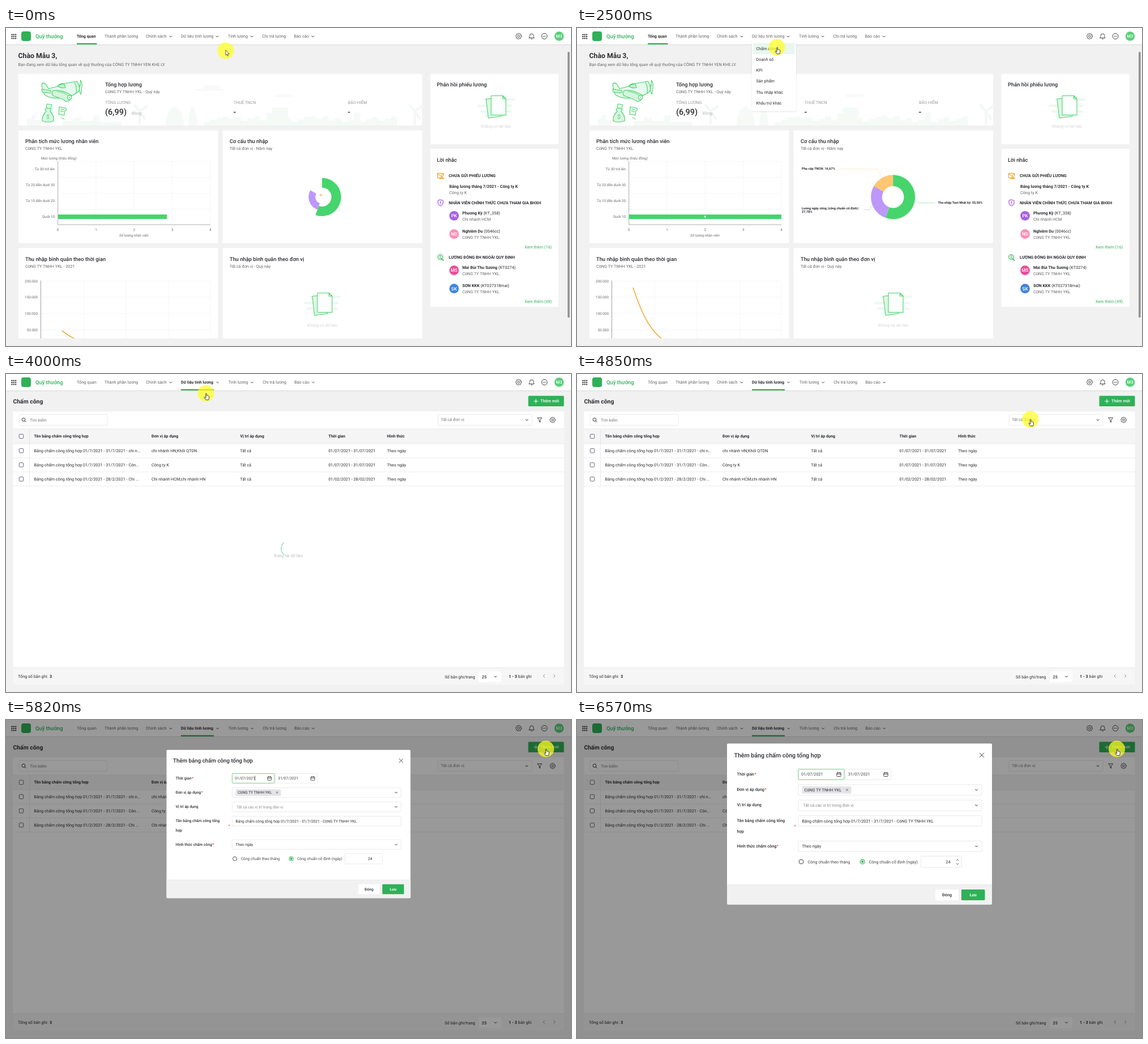
Recreate the animation shown at these times as an HTML page. Size 998 by 561 pixels, loop 6820 ms.

```html
<!DOCTYPE html>
<html lang="vi">
<head>
<meta charset="utf-8">
<title>Payroll walkthrough</title>
<style>
html, body { margin: 0; width: 100%; height: 100%; overflow: hidden; background: #f1f1f1; }
svg { display: block; width: 100vw; height: 100vh; font-family: Roboto, Arial, sans-serif; text-rendering: geometricPrecision; }
</style>
</head>
<body>
<svg id="stage" viewBox="0 0 998 561" preserveAspectRatio="none"></svg>
<script>
const GREEN = '#2fb157', LIME = '#46d56c', DARK = '#2b2d31', MID = '#666', PALE = '#e0e0e0';
const LOOP = 6820;
const COMPANY = 'CôNG TY TNHH YKL';

// Markup helpers
const text = (x, y, s, { size = 7.28, fill = DARK, w = 400, a = 'start', i = 0 } = {}) =>
  `<text x="${x}" y="${y}" font-size="${size}" fill="${fill}" font-weight="${w}" text-anchor="${a}"${i ? ' font-style="italic"' : ''}>${s}</text>`;
const rect = (x, y, w, h, fill = '#fff', extra = '') =>
  `<rect x="${x}" y="${y}" width="${w}" height="${h}" fill="${fill}" ${extra}/>`;
const path = (d, stroke, w = 1, fill = 'none', extra = '') =>
  `<path d="${d}" stroke="${stroke}" stroke-width="${w}" fill="${fill}" stroke-linecap="round" stroke-linejoin="round" ${extra}/>`;
const disc = (x, y, r, fill, extra = '') => `<circle cx="${x}" cy="${y}" r="${r}" fill="${fill}" ${extra}/>`;
const group = (id, body) => `<g id="${id}">${body}</g>`;
const at = (x, y, body) => `<g transform="translate(${x} ${y})">${body}</g>`;
const chevron = (x, y, c = '#444') => path(`M${x - 2} ${y - 1}l2 2 2-2`, c, 1);
const field = (x, y, w, h, stroke = PALE) => rect(x, y, w, h, '#fff', `stroke="${stroke}" stroke-width=".7" rx="1.2"`);
const cross = (x, y, r, c, w) => path(`M${x - r} ${y - r}l${2 * r} ${2 * r}m0 ${-2 * r}l${-2 * r} ${2 * r}`, c, w);

function gear(x, y, r) {
  let d = '';
  for (let k = 0; k < 32; k++) {
    const a = k * Math.PI / 16, q = k % 4 < 2 ? r : r * .8;
    d += (k ? 'L' : 'M') + (x + q * Math.cos(a)).toFixed(2) + ' ' + (y + q * Math.sin(a)).toFixed(2);
  }
  return path(d + 'Z', '#333', .9) + disc(x, y, r * .36, 'none', 'stroke="#333" stroke-width=".9"');
}

// Top bar
function nav(id, active) {
  const s = active ? .7 : 0;
  const items = [[125, 'Tổng quan'], [174, 'Thành phần lương'], [247, 'Chính sách', 291], [309, 'Dữ liệu tính lương', 373 + s],
    [392 + s, 'Tính lương', 434 + s], [452.5 + s, 'Chi trả lương'], [508.5 + s, 'Báo cáo', 542 + s]];
  const on = active ? 3 : 0;
  return group(id, items.map(([x, label, c], k) =>
    text(x, 17.3, label, k === on ? { size: 7.2, w: 700 } : { size: 7.4, fill: MID }) + (c ? chevron(c, 15) : '')).join('') +
    (active ? rect(309, 26.7, 58, 2.3, GREEN) : rect(125, 26.7, 35.5, 2.3, GREEN)));
}

function topBar() {
  let dots = '';
  for (let k = 0; k < 9; k++) dots += rect(9.4 + k % 3 * 3.3, 10.6 + (k / 3 | 0) * 3.3, 2.2, 2.2, '#333', 'rx=".6"');
  return rect(0, 28, 998, 2.2, '#dcdcdc') + rect(0, 0, 998, 29) + dots +
    rect(27, 6, 17, 17, GREEN, 'rx="4"') +
    text(52, 17.8, 'Quỹ thưởng', { size: 9.4, fill: GREEN, w: 500 }) +
    nav('navHome', 0) + nav('navList', 1) + gear(905.5, 14.5, 5.2) +
    path('M924 17.5h9c-1-1.2-1.2-2-1.2-4a3.3 3.3 0 0 0-6.6 0c0 2-.2 2.8-1.2 4zM927.3 19.3q1.2 1 2.4 0', '#333', .9) +
    disc(951, 14.5, 5, 'none', 'stroke="#333" stroke-width=".9"') +
    [-2.1, 0, 2.1].map(d => disc(951 + d, 14.5, .7, '#333')).join('') +
    disc(977, 14.5, 8.3, '#5bd07b') + text(977, 17.2, 'M3', { size: 7.5, fill: '#fff', w: 500, a: 'middle' });
}

// Dashboard
const card = (x, y, w, h) => rect(x, y, w, h, '#fff', 'rx="1.5"');
const heading = (x, y, s, sub) => text(x, y, s, { size: 9.36, w: 500 }) + text(x, y + 12.2, sub, { fill: MID });

const emptyState = (x, y, drop) => at(x, y,
  [[-22, -15, 55], [-33, -4, 62], [-28, 6, 56], [-20, 13, 40]].map(([a, b, w]) => rect(a, b, w, 4, '#ecf8f0', 'rx="2"')).join('') +
  path('M-17.500-14l23-2.500 4 33-23 3.200z'.replace(/00/g, ''), LIME, 1.1, '#e0f6e7') +
  path('M-8.5-19.800h20.500l5.500 5.500v28.500h-26z'.replace(/00/g, ''), LIME, 1.1, '#fbfefc') + path('M12-19.8v5.5h5.5z', LIME, 1.1, '#cdf2d8')) +
  text(x, y + drop, 'Không có dữ liệu', { fill: '#d4d4d4', a: 'middle', i: 1, size: 7.4 });

function skyline() {
  let d = 'M37 172v-12h8v-7h6v9h10v10zM100 172v-8h18v-6h14v6h22v-10h12v12h38v6z' +
    'M282 172q0-26 16-34 16 8 16 34zM322 172q1-28 8-33 7 5 8 33z';
  for (let k = 0; k < 31; k++) {
    const h = 6 + (k * 37 % 11) + (k % 7 === 3 ? 9 : 0);
    d += `M${350 + k * 11} 172v${-h}h11v${h}z`;
  }
  const blades = (x, y) => path(`M${x} ${y + 22}V${y}l-9-11M${x} ${y}l13-9M${x} ${y}l9 13`, '#f3f7f5', 4);
  return path(d, 'none', 0, '#f5faf7') + blades(236, 147) + blades(722, 147) +
    rect(334, 107, 52, 4, '#f8faf9', 'rx="2"') + rect(348, 101, 30, 9, '#f8faf9', 'rx="4"') +
    rect(475, 117, 33, 5, '#f8faf9', 'rx="2"') + rect(470, 140, 28, 32, '#f5faf7');
}

const plane =
  path('M66 111q-4-8-2-14 4-1 7 3l4 7 16-4q5-6 12-5l22-4q6 7 4 17-8 8-22 11-24 5-37-3-4-2-4-8z', LIME, 1.2, '#e6f9ec') +
  path('M63 108l16 2q1 4-2 5l-13-2zM92 103q4-5 11-4l2 6q-7 2-13-2zM121 96q5 8 3 18', LIME, 1.1, '#c9f1d5') +
  path('M84 110q16-1 32 9-1 9-9 11-9-6-23-10-6-5 0-10z', LIME, 1.2, '#d5f5de') + path('M90 112q12 1 23 9', LIME, .9) +
  path('M128 101h4M131.500 92q4 6 2.500 12.500-1 6-1.500 12.500-4-5-2.500-12.500 2-6 1.500-12.500z', LIME, 1.1, '#f2fcf5') +
  disc(112, 122.5, 3.6, '#fff', `stroke="${LIME}" stroke-width="1.3"`) + disc(112, 122.5, 1, LIME) +
  path('M71 140l1-6 9 1-2 7z', LIME, 1, '#e3f8ea') +
  path('M69 143q5-3 11 0l-2 4q8 9 6 17-10 4-20 0-1-9 7-17z', LIME, 1.2, '#d9f6e2') +
  text(74, 160, '$', { size: 10, fill: LIME, a: 'middle' }) +
  path('M94 139l11 2q4 4-1 5l-1 8-10-2z', LIME, 1.1, '#e9faee') + path('M97 143l5 1M96.5 146.500l5 1M98 158l5 3', LIME, 1);

function barChart() {
  const small = { size: 6.3, fill: MID };
  return heading(34, 202.5, 'Phân tích mức lương nhân viên', COMPANY) +
    text(62, 232, 'Mức lương (triệu đồng)', { ...small, i: 1 }) +
    path('M92 235.5h269M92 263.5h269M92 291.5h269M92 319.5h269M159 235v112M226.5 235v112M293.5 235v112M361 235v112', '#f3f3f3', .7) +
    ['Từ 30 trở lên', 'Từ 20 đến dưới 30', 'Từ 10 đến dưới 20', 'Dưới 10'].map((s, k) => text(86, 251 + 28 * k, s, { ...small, a: 'end' })).join('') +
    [0, 1, 2, 3, 4].map(k => text(91.5 + 67.4 * k, 358, k, { ...small, a: 'middle' })).join('') +
    text(226, 368.3, 'Số lượng nhân viên', { ...small, a: 'middle', i: 1 }) +
    `<rect id="bar" x="92" y="329" height="8" fill="${LIME}"/>` + path('M91.7 235v112h269', '#999', .8);
}

const bold = { size: 5.7, w: 700 };
const pieLabels = path('M463 249h68l7.5 15', '#fbe0ae', .7) + path('M596.5 305l7 3.5h29', '#8be2a6', .7) + path('M506 320.5h11.5l4-9', '#d6bdfb', .7) +
  text(397, 250.3, 'Phụ cấp TNCN: 16,67%', bold) + text(637.5, 310.4, 'Thu nhập Test Nhật ký: 55,56%', bold) +
  text(397, 319.5, 'Lương ngày công (công chuẩn cố định):', bold) + text(397, 325.6, '27,78%', bold) +
  text(226, 335.3, '4', { size: 6.2, fill: '#fff', w: 700, a: 'middle' });

function lineChart() {
  return heading(34, 410.5, 'Thu nhập bình quân theo thời gian', COMPANY + ' - 2021') +
    path('M62 446.5h299M62 475h299M62 503.7h299M62 532.5h299M137 446v102M212 446v102M287.5 446v102M361 446v102', '#f3f3f3', .7) +
    [200, 150, 100, 50].map((n, k) => text(56, 448.5 + 28.7 * k, n + '.000', { size: 6.3, fill: MID, a: 'end' })).join('') +
    path('M61.5 446v102', '#888', .8) +
    '<path id="curve" fill="none" stroke="#f79e1b" stroke-width="1.4"/>';
}

const person = (y, color, ini, name, code, unit) => disc(791.5, y, 8.4, color) +
  text(791.5, y + 2.9, ini, { size: 8, fill: '#fff', w: 500, a: 'middle' }) +
  text(806, y - 2.3, `<tspan font-weight="700">${name}</tspan> (${code})`) + text(806, y + 8.5, unit, { fill: MID });

function sidebar() {
  const head = { w: 700 }, more = { fill: GREEN, a: 'end' };
  return card(749.5, 81, 226.5, 124) + text(761, 102.8, 'Phản hồi phiếu lương', { size: 9.36, w: 500 }) + emptyState(865.5, 139.3, 36.7) +
    card(749.5, 213, 226.5, 279) + text(761, 235.6, 'Lời nhắc', { size: 9.36, w: 500 }) +
    disc(767.5, 260.5, 7, '#fff6e9') + path('M762.5 256.5h10v4M762.5 256.5v8h5M762.5 257l5 4 5-4', '#f59b23', 1) + path('M770 261l3.4 5h-6.8z', '#f59b23', .8, '#fbbd62') +
    text(782, 263, 'CHƯA GỬI PHIẾU LƯƠNG', head) +
    text(783, 282.3, 'Bảng lương tháng 7/2021 - Công ty K', head) + text(783, 293, 'Công ty K', { fill: MID }) +
    disc(767.5, 308.5, 7, '#f5ecfc') + path('M767.5 303l4.5 1.6v4q-.5 3.5-4.5 5.4-4-1.9-4.5-5.4v-4zM767.5 306v3.5M767.5 311.3v.1', '#9a52d8', 1) +
    text(782, 311, 'NHÂN VIÊN CHÍNH THỨC CHƯA THAM GIA BHXH', head) +
    person(331.3, '#a661df', 'PK', 'Phương Kỳ', 'KT_358', 'Chi nhánh HCM') +
    person(363.5, '#fb90b3', 'ND', 'Nghiêm Du', '0046cc', COMPANY) + text(964, 389, 'Xem thêm (16)', more) +
    disc(767.5, 404.5, 7, '#e8f8ed') + disc(767, 404, 4.2, 'none', `stroke="${GREEN}" stroke-width="1"`) +
    text(767, 406.3, '$', { size: 6.2, fill: GREEN, a: 'middle' }) + path('M769 407l3.5 3', GREEN, 1.6) +
    text(782, 407, 'LƯƠNG ĐÓNG BH NGOÀI QUY ĐỊNH', head) +
    person(427.5, '#ec4d9b', 'MS', 'Mai Bùi Thu Sương', 'KT0274', COMPANY) +
    person(459.7, '#3f86dc', 'SK', 'SƠN KKK', 'KT027318mai', COMPANY) + text(964, 485.2, 'Xem thêm (49)', more);
}

function dashboard() {
  const cap = { fill: '#999' }, big = { size: 14.5, w: 500 };
  return text(21.5, 53, 'Chào Mẫu 3,', { size: 12.3, w: 700 }) +
    text(21.5, 67, 'Bạn đang xem dữ liệu tổng quan về quỹ thưởng của CÔNG TY TNHH YEN KHE LY.', { fill: MID }) +
    card(22, 81, 713, 91) + skyline() + plane + heading(175, 102.8, 'Tổng hợp lương', COMPANY + ' - Quý này') +
    text(175, 134, 'TỔNG LƯƠNG', cap) + text(402, 134, 'THUẾ TNCN', cap) + text(604, 134, 'BẢO HIỂM', cap) +
    text(175, 153.3, '(6,99)', big) + text(222, 153.3, 'Đồng', { fill: '#b0b0b0' }) + text(401.5, 153.3, '-', big) + text(603.5, 153.3, '-', big) +
    card(22, 180.5, 352.5, 199) + barChart() +
    card(382.5, 180.5, 352.5, 199) + heading(395, 202.5, 'Cơ cấu thu nhập', 'Tất cả đơn vị - Năm nay') +
    `<path id="s0" fill="${LIME}"/><path id="s1" fill="#be97fb"/><path id="s2" fill="#fec671"/>` + group('labels', pieLabels) +
    `<g clip-path="url(#fold)">${card(22, 388, 352.5, 170)}${lineChart()}${card(382.5, 388, 352.5, 170)}</g>` +
    heading(395, 410.5, 'Thu nhập bình quân theo đơn vị', 'Tất cả đơn vị - Quý này') + emptyState(558.5, 487.3, 40) +
    sidebar() + rect(992, 42, 3.6, 469, '#939393', 'rx="1.8"');
}

const menu = () => rect(309, 22, 78, 124.5, '#fff', 'rx="2" filter="url(#soft)"') +
  '<rect id="pick" x="311.5" y="26.5" width="73" height="19.5" fill="#e8f7ef"/>' +
  ['Chấm công', 'Doanh số', 'KPI', 'Sản phẩm', 'Thu nhập khác', 'Khấu trừ khác'].map((s, k) => text(316.5, 38.5 + 19.25 * k, s)).join('');

// Timesheet list
const checkbox = y => rect(23.3, y - 3.7, 7.4, 7.4, '#fff', 'stroke="#55566b" stroke-width=".9" rx="1.3"');
const columns = [49.5, 257, 413.5, 569.5, 673];

function listPage() {
  const heads = ['Tên bảng chấm công tổng hợp', 'Đơn vị áp dụng', 'Vị trí áp dụng', 'Thời gian', 'Hình thức'];
  return text(12.5, 51.5, 'Chấm công', { size: 10.4, w: 700 }) +
    '<rect id="add" x="922.5" y="38.5" width="63" height="18.5" rx="1.5"/>' + path('M932.5 48h7M936 44.5v7', '#fff', 1) +
    text(944, 50.4, 'Thêm mới', { fill: '#fff', w: 500 }) +
    rect(12.5, 66, 973, 452) + field(23, 71.5, 156, 19) +
    disc(31, 80.5, 2.9, 'none', 'stroke="#333" stroke-width="1"') + path('M33.2 82.8l2 2', '#333', 1) +
    text(42, 83.5, 'Tìm kiếm', { fill: '#777' }) + field(763, 71.5, 166, 19) + text(768, 83.3, 'Tất cả đơn vị', { fill: '#777' }) + chevron(920, 81.2, '#222') +
    path('M939 77.2h7.5l-2.9 4v4l-1.7-1.2v-2.8z', '#333', .9) + gear(965.5, 81, 4.9) +
    rect(12.5, 97, 973, 26, '#f5f5f6') + path('M12.5 97h973M12.5 123h973', '#e3e3e3', .7) + path('M41.5 97v26', PALE, .7) +
    checkbox(109.9) + heads.map((s, k) => text(columns[k], 112.3, s, { w: 700, size: 7.1 })).join('') +
    rect(12.5, 518, 973, 30, '#f6f6f6') + path('M12.5 518h973', '#e3e3e3', .7);
}

function listRows() {
  const rows = [['01/7/2021 - 31/7/2021 - chi n...', 'chi nhánh HN;Khối QTDN', '01/07/2021 - 31/07/2021'],
    ['01/7/2021 - 31/7/2021 - Côn...', 'Công ty K', '01/07/2021 - 31/07/2021'],
    ['01/2/2021 - 28/2/2021 - Chi ...', 'Chi nhánh HCM;chi nhánh HN', '01/02/2021 - 28/02/2021']];
  return rows.map(([name, unit, span], k) => {
    const y = 135.3 + 25 * k;
    return checkbox(y) + ['Bảng chấm công tổng hợp ' + name, unit, 'Tất cả', span, 'Theo ngày'].map((s, c) => text(columns[c], y + 2.4, s)).join('') +
      path(`M12.5 ${148 + 24.8 * k}h973`, '#e6e6e6', .7);
  }).join('') + path('M41.5 123v74.6', PALE, .7) +
    text(21, 536, 'Tổng số bản ghi: <tspan font-weight="700" dx="1">3</tspan>') + text(775, 536.5, 'Số bản ghi/trang') +
    rect(835, 524.5, 40, 19) + text(840.5, 536.5, '25', { w: 500 }) + chevron(864.5, 534, '#222') +
    text(888, 536.2, '<tspan font-weight="700">1 - 3</tspan> bản ghi') +
    path('M951.5 530.5l-2.5 2.5 2.5 2.5M967.5 530.5l2.5 2.5-2.5 2.5', '#888', .9);
}

const loader = group('ring', path('M-8.3-10A13 13 0 0 0-8.3 10', '#66c4a0', 1.6)) +
  text(499, 322.8, 'Đang tải dữ liệu', { a: 'middle', fill: '#888' });

// Dialog
const calendar = (x, y) => rect(x - 3.6, y - 3, 7.2, 6.6, 'none', 'stroke="#333" stroke-width=".9" rx=".8"') +
  path(`M${x - 3.6} ${y - .6}h7.2M${x - 1.8} ${y - 4}v1.6M${x + 1.8} ${y - 4}v1.6`, '#333', .9);

function dialog() {
  const star = '<tspan fill="#f0322f" dx=".5">*</tspan>';
  const label = (y, s) => text(282.5, y, s, { w: 500, size: 7.3 });
  return rect(265, 41.5, 468, 284, '#fff', 'rx="2"') + rect(265, 290.5, 468, 35, '#f1f1f1', 'rx="2"') + path('M265 290.5h468', PALE, .6) +
    text(277.5, 65.7, 'Thêm bảng chấm công tổng hợp', { size: 10.6, w: 500 }) + cross(715, 62, 3.8, '#444', 1) +
    label(98.3, 'Thời gian' + star) + field(391, 86.8, 81, 18.4, GREEN) + text(396, 98.3, '01/07/2021', { fill: '#444' }) + calendar(462.5, 96) +
    field(474, 86.8, 81, 18.4) + text(479, 98.3, '31/07/2021', { fill: '#444' }) + calendar(545.5, 96) +
    '<rect id="caret" x="434.3" y="91" width=".8" height="9.5" fill="#222"/>' +
    label(125.2, 'Đơn vị áp dụng' + star) + field(391, 114, 324, 18.5) + rect(397.5, 117, 87, 12.8, '#e4e4e8', 'rx="1.5"') +
    text(401.5, 125.9, COMPANY) + cross(477, 123.3, 1.7, '#555', .8) + chevron(705.5, 123.3, '#222') +
    label(152.3, 'Vị trí áp dụng') + field(391, 141.2, 324, 18.8) + text(399.5, 153.3, 'Tất cả các vị trí trong đơn vị', { fill: '#888' }) + chevron(705.5, 150.7, '#222') +
    label(180.2, 'Tên bảng chấm công tổng') + label(198.5, 'hợp') + text(383.5, 189.5, '*', { fill: '#f0322f' }) +
    field(391, 168.7, 324, 18.5) + text(397.5, 180.6, 'Bảng chấm công tổng hợp 01/7/2021 - 31/7/2021 - ' + COMPANY) +
    label(225, 'Hình thức chấm công' + star) + field(391, 213.5, 324, 18.5) + text(397.5, 225.4, 'Theo ngày') + chevron(705.5, 223, '#222') +
    disc(396, 250, 3.9, '#fff', 'stroke="#444" stroke-width="1"') + text(407.5, 252.5, 'Công chuẩn theo tháng', { fill: '#444' }) +
    disc(504.2, 250, 3.9, '#fff', `stroke="${GREEN}" stroke-width="1.1"`) + disc(504.2, 250, 2.1, GREEN) +
    text(515.5, 252.5, 'Công chuẩn cố định (ngày)', { fill: '#444' }) + field(607.3, 240.3, 72, 19.7) + text(659.5, 252.8, '24', { a: 'end' }) +
    group('steps', path('M670 248l2-2 2 2M670 253l2 2 2-2', '#555', .9)) +
    rect(633, 299, 41, 19, '#fff', 'rx="1.5"') + text(653.5, 311.2, 'Đóng', { a: 'middle', w: 500 }) +
    rect(679, 299, 41.5, 19, GREEN, 'rx="1.5"') + text(699.7, 311.2, 'Lưu', { a: 'middle', w: 700, fill: '#fff' });
}

const pointer = disc(0, 0, 14.6, '#ffff22', 'opacity=".73"') +
  group('arrow', path('M0-.5v8.5l2-1.8 1.4 3.3 1.3-.6-1.4-3.1h2.6z', '#222', .7, '#fff')) +
  group('hand', path('M-.2.6q.9-1 1.7 0v3.6q.8-.6 1.5.2.8-.5 1.5.3.9-.3 1.2.7v3l-1 3.3h-4.7l-2.9-4.3q.3-1.3 1.5-.4l1.2 1z', '#111', .8, '#fff'));

const stage = document.getElementById('stage');
stage.innerHTML = `<defs><clipPath id="fold"><rect width="998" height="547.5"/></clipPath>
  <filter id="soft" x="-20%" y="-20%" width="140%" height="140%"><feDropShadow dx="0" dy="1" stdDeviation="1.2" flood-opacity=".13"/></filter></defs>` +
  rect(0, 0, 998, 561, '#f1f1f1') + group('home', dashboard()) + group('list', listPage() + group('rows', listRows()) + group('load', loader)) +
  topBar() + group('menu', menu()) + rect(0, 0, 998, 561, '#000', 'id="shade" opacity=".4"') + group('dialog', dialog()) + group('pointer', pointer);

const $ = {};
stage.querySelectorAll('[id]').forEach(e => $[e.id] = e);

// Motion
const clamp = v => Math.max(0, Math.min(1, v));
const ramp = (t, a, b) => clamp((t - a) / (b - a));
const easeOut = p => 1 - (1 - p) ** 3;
const show = (id, on) => $[id].setAttribute('display', on ? 'inline' : 'none');
const set = (id, name, v) => $[id].setAttribute(name, v);

function slice(from, to, k) {
  const pt = (deg, r) => {
    const a = deg * Math.PI / 180;
    return `${558.2 + r * k * Math.sin(a)} ${298.2 - r * k * Math.cos(a)}`;
  };
  const big = to - from > 180 ? 1 : 0, R = 39, r = 19.3;
  return `M${pt(from, R)}A${R * k} ${R * k} 0 ${big} 1 ${pt(to, R)}L${pt(to, r)}A${r * k} ${r * k} 0 ${big} 0 ${pt(from, r)}Z`;
}

// time, x, y
const route = [[0, 388, 40], [350, 391, 40], [1250, 391, 40], [1330, 380, 32], [1430, 360, 20], [1530, 351, 17], [2280, 351, 17],
  [2390, 352, 27], [2500, 353, 34], [4500, 353, 34], [4600, 440, 48], [4700, 600, 66], [4850, 800, 80], [4980, 895, 72],
  [5080, 937, 58], [5170, 952, 51], [5230, 953.5, 51], [LOOP, 953.5, 51]];

function where(t) {
  const k = route.findIndex(p => p[0] > t), a = route[k - 1], b = route[k], f = (t - a[0]) / (b[0] - a[0]);
  return [a[1] + (b[1] - a[1]) * f, a[2] + (b[2] - a[2]) * f];
}

const overLink = t => (t >= 1400 && t < 4540) || (t >= 4780 && t < 4940) || t >= 5080;

function draw(t) {
  const home = t < 2890, listed = t >= 3100, open = t >= 5820;
  show('home', home);
  show('navHome', !listed);
  show('navList', listed);
  show('list', listed);

  set('bar', 'width', 269 * easeOut(ramp(t, -341, 659)));
  [[0, 200], [200, 300], [300, 360]].forEach(([a, b], k) =>
    set('s' + k, 'd', slice(a, b, easeOut(ramp(t, -341 + 153 * k, 359 + 153 * k)))));
  const lift = easeOut(ramp(t, -95, 905)), y = v => 561 - (561 - v) * lift;
  set('curve', 'd', `M99 ${y(458)}C110 ${y(490)} 128 ${y(548)} 174 ${y(561)}`);
  set('labels', 'opacity', ramp(t, 700, 960));

  show('menu', home && t >= 1920);
  set('menu', 'opacity', ramp(t, 1880, 2080));
  show('pick', t >= 2390);

  show('rows', t >= 3820);
  show('load', t < 4250);
  set('load', 'opacity', 1 - ramp(t, 3830, 4230));
  set('ring', 'transform', `translate(499 308) rotate(${(t - 4000) * .3})`);
  set('add', 'fill', t >= 5210 && t < 5460 ? '#37bd60' : GREEN);

  show('shade', open);
  show('dialog', open);
  const k = .92 + .08 * easeOut(ramp(t, 5820, 6170));
  set('dialog', 'transform', `translate(499 183.5) scale(${k}) translate(-499 -183.5)`);
  show('caret', t < 6320);
  set('steps', 'opacity', ramp(t, 5900, 6100));

  set('pointer', 'transform', `translate(${where(t).join(' ')})`);
  show('arrow', !overLink(t));
  show('hand', overLink(t));
}

const start = performance.now();
function tick() {
  draw((performance.now() - start) % LOOP);
  requestAnimationFrame(tick);
}
tick();
</script>
</body>
</html>
```
